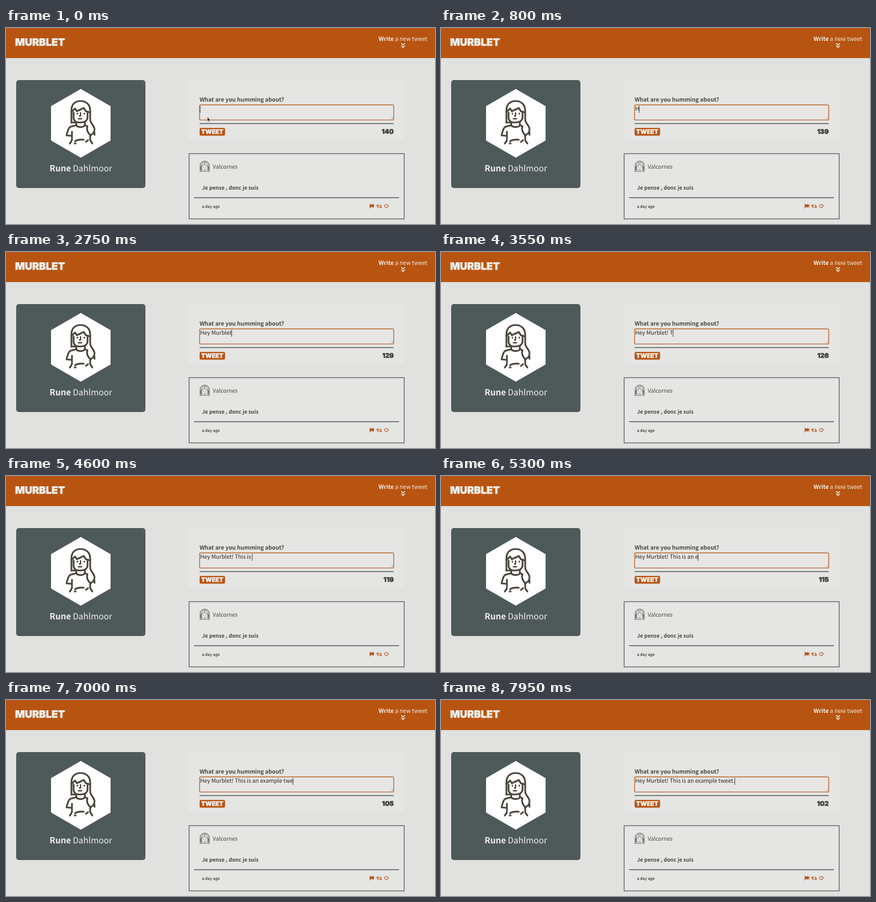
Animation, 800 px wide and 365 px high, one loop 8 s. Source, as an HTML page:

```html
<!DOCTYPE html>
<html lang="en">
<head>
<meta charset="utf-8">
<title>Murblet</title>
<style>
  html, body { margin: 0; width: 100%; height: 100%; overflow: hidden; background: #e1e1df; }
  svg { display: block; width: 800px; height: 365px; }
  text {
    font-family: "Noto Sans CJK JP", "Noto Sans CJK SC", "Noto Sans CJK", "Open Sans", sans-serif;
    font-weight: 300; fill: #4b4742; white-space: pre; text-rendering: geometricPrecision;
  }
  .bold { font-weight: 600; }
  .light { fill: #efeeeb; }
  .block { font-family: Inter, sans-serif; font-weight: 900; stroke-width: .5; stroke: #46423d; fill: #46423d; }
  .block.light { stroke: #efeeeb; fill: #efeeeb; }
  .line { fill: none; stroke-linecap: round; stroke-linejoin: round; }
</style>
</head>
<body>
<svg viewBox="0 0 800 365">
  <rect width="800" height="365" fill="#e1e1df"/>

  <g id="header">
    <rect width="800" height="56" fill="#b85411"/>
    <text class="block light" x="17" y="33" font-size="19">MURBLET</text>
    <text class="light" x="785.5" y="24" font-size="10.7" text-anchor="end"><tspan class="bold">Write</tspan> a new tweet</text>
    <path class="line" d="M737.4 28.8l3 2.8 3-2.8M737.4 33.4l3 2.8 3-2.8" stroke="#efeeeb" stroke-width="1.7"/>
  </g>

  <g id="profile">
    <rect x="19" y="97" width="241" height="201" rx="5" fill="#4e595a"/>
    <path d="M139.5 113.5L195 145.5V209.5L139.5 241.5L84 209.5V145.5Z" fill="#fff"/>
    <g class="line" stroke="#49433c" stroke-width="3.2">
      <path d="M122 176V153C122 142 129 136 139 136C150 136 157 143 157 154V170C157 179 166 181 165 190C164 196 161 198 157 200"/>
      <path d="M122 156L129 150L132 155L145 149L149 155L156 157"/>
      <path d="M126 157V167C126 173 131 176 138 176C147 176 152 172 152 166V156"/>
      <path d="M122 176H131V181M147 175V181L152 183C149 190 154 197 158 200"/>
      <path d="M131 181L120 184C116 186 114 195 113 200L123 201M123 193V207C123 211 121 213 119 215"/>
      <path d="M131 181C133 185 144 186 147 181M157 200V208C158 212 160 213 161 215M165 199V194"/>
      <path d="M129 211C133 207 139 208 145 208M128 215H130M149 212L153 209"/>
      <path d="M139 158V164H137M133 159V160M146 159V160M135 169H141" stroke-width="2.4"/>
    </g>
    <text class="light" x="139.5" y="267" font-size="15.7" text-anchor="middle"><tspan class="bold">Rune</tspan> Dahlmoor</text>
  </g>

  <g id="composer">
    <rect x="341" y="97" width="402" height="113" fill="#e5e5e3"/>
    <text class="bold" x="361" y="137" font-size="10.5">What are you humming about?</text>
    <rect x="361" y="143.2" width="362" height="28.2" rx="2" fill="#e6e6e4" stroke="#b9622b" stroke-width="1.4"/>
    <path d="M717.8 170L721.8 166M720 170L721.8 168.2" stroke="#8a8a86" stroke-width=".6"/>
    <text id="draft" x="362" y="154" font-size="10.4" style="fill:#292725"></text>
    <rect id="caret" y="145" width="1" height="13" fill="#3a3835"/>
    <path d="M361 178H723" stroke="#4e595a" stroke-width="1.6"/>
    <rect x="361" y="186" width="47.5" height="14.6" rx="3" fill="#b85411"/>
    <text class="block light" x="384.7" y="197.3" font-size="11.2" text-anchor="middle">TWEET</text>
    <text id="counter" class="block" x="723" y="197" font-size="12" text-anchor="end">140</text>
    <path id="pointer" d="M375.6 165.8V174L377.5 172.3L378.8 175.2L380.2 174.5L378.9 171.8H381.4Z" fill="#111" stroke="#f4f4f2" stroke-width=".6"/>
  </g>

  <g id="post">
    <rect x="341.5" y="234" width="401" height="121.5" fill="#e5e5e3" stroke="#4e595a" stroke-width="1.3"/>
    <g class="line" stroke="#55514c" stroke-width="1">
      <path d="M362 267V257C362 251 365 248 370.3 248C376 248 379 251 379 257V267H375.5M362 267H365.5"/>
      <path d="M364.5 257V262C365 269 375.5 269 376.5 262V257C373 257 371.5 255 370.5 252.5C369 255.5 367 257 364.5 257Z"/>
      <path d="M364 255C365 252 367 250 370 250C374 250 376 252 377 255M363.3 258V265M377.8 258V265"/>
      <path d="M368 260V260.5M373 260V260.5M369 264H372"/>
    </g>
    <text x="385.5" y="262" font-size="10.3">Valcornes</text>
    <text class="bold" x="365.5" y="301" font-size="9.75">Je pense , donc je suis</text>
    <path d="M350.5 316H733" stroke="#4e595a" stroke-width="1.4"/>
    <text class="bold" x="365.5" y="334.5" font-size="7.1">a day ago</text>
    <g class="line" stroke="#b9571a" stroke-width="1.2">
      <path d="M678.8 328.4V335.6"/>
      <path d="M679.2 328.8C681 327.7 683 330 686 328.8V333.3C683 334.5 681 332.2 679.2 333.3Z" fill="#b9571a" stroke-width=".8"/>
      <path d="M691.2 331L692.8 329.3L694.4 331M692.8 329.6V334H696M700.6 333L699 334.7L697.4 333M699 334.4V330H695.8"/>
      <path d="M709.3 335.4L706.2 332.3C704.6 330.4 707.3 327.4 709.3 330C711.3 327.4 714 330.4 712.4 332.3Z" stroke-width="1.1"/>
    </g>
  </g>
</svg>

<script>
  const LOOP = 8000;
  const LIMIT = 140;
  const MESSAGE = "Hey Murblet! This is an example tweet.";
  // [time in ms, characters typed]
  const TYPING = [[600, 0], [1500, 6], [2500, 11], [3450, 14], [4550, 21], [6050, 30], [7400, MESSAGE.length]];

  const [draft, caret, counter, pointer] =
    ["draft", "caret", "counter", "pointer"].map(id => document.getElementById(id));

  function typedAt(time) {
    const next = TYPING.findIndex(([start]) => time < start);
    if (next === 0) return 0;
    if (next < 0) return MESSAGE.length;
    const [t0, n0] = TYPING[next - 1];
    const [t1, n1] = TYPING[next];
    return Math.floor(n0 + (n1 - n0) * (time - t0) / (t1 - t0));
  }

  function render(now) {
    const typed = typedAt(now % LOOP);
    draft.textContent = MESSAGE.slice(0, typed);
    caret.setAttribute("x", 361.5 + (typed ? draft.getComputedTextLength() : 0));
    counter.textContent = LIMIT - typed;
    pointer.style.visibility = typed ? "hidden" : "visible";
  }

  const origin = performance.now();
  function tick() {
    render(performance.now() - origin);
    requestAnimationFrame(tick);
  }
  tick();
</script>
</body>
</html>
```
